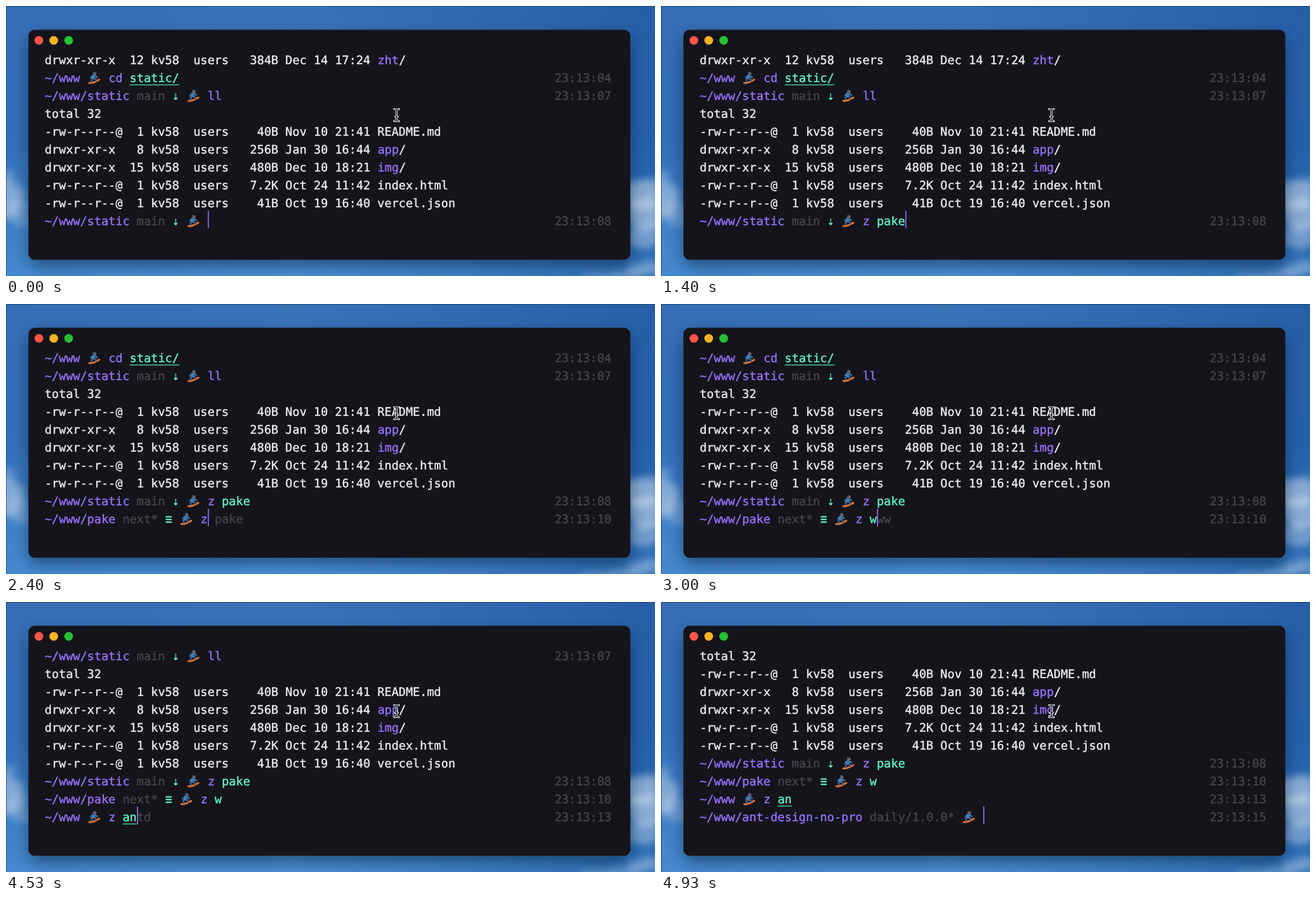
Write an HTML page that moves like this. It is 1160x483 px and loops after 5200 ms.

```html
<!DOCTYPE html>
<html lang="en">
<head>
<meta charset="utf-8">
<title>Terminal</title>
<style>
  html, body { margin: 0; width: 100%; height: 100%; overflow: hidden; background: #3a72b8; }
  svg { display: block; width: 100%; height: 100%; }
  text {
    font-family: "DejaVu Sans Mono", "Noto Sans Mono", monospace;
    font-size: 21.03px;
    white-space: pre;
    text-rendering: geometricPrecision;
    stroke-width: .45px;
  }
  .white { fill: #edecee; stroke: #edecee; }
  .purple { fill: #9671fb; stroke: #9671fb; }
  .green { fill: #5ff5c0; stroke: #5ff5c0; }
  .gray { fill: #454449; stroke: #454449; }
  .sign { fill: #5ff5c0; font-weight: bold; }
  .link { fill: #5ff5c0; }
</style>
</head>
<body>
<svg viewBox="0 0 1160 483" preserveAspectRatio="none">
  <defs>
    <linearGradient id="sky" x1="0" y1="0" x2="0" y2="1">
      <stop offset="0" stop-color="#3a72b8"/>
      <stop offset=".5" stop-color="#3574be"/>
      <stop offset="1" stop-color="#4c92d8"/>
    </linearGradient>
    <linearGradient id="side">
      <stop offset="0" stop-color="#134f9c" stop-opacity=".12"/>
      <stop offset=".45" stop-color="#134f9c" stop-opacity="0"/>
      <stop offset="1" stop-color="#0f4791" stop-opacity=".45"/>
    </linearGradient>
    <filter id="cloud" filterUnits="userSpaceOnUse" x="-60" y="240" width="1280" height="300">
      <feTurbulence type="fractalNoise" baseFrequency=".03" numOctaves="4" seed="4" result="n"/>
      <feDisplacementMap in="SourceGraphic" in2="n" scale="30" xChannelSelector="R" yChannelSelector="G"/>
      <feGaussianBlur stdDeviation="6.500"/>
    </filter>
    <filter id="blur" x="-20%" y="-20%" width="140%" height="140%">
      <feGaussianBlur stdDeviation="14"/>
    </filter>
    <g id="rider" fill="none" stroke-linecap="round" stroke-linejoin="round">
      <path d="M3.500 1.500Q9 2 14-.5T21.500-4.500" stroke="#8a431f" stroke-width="3.800"/>
      <path d="M3.500 1Q9 1.500 14-1T21.500-5" stroke="#ee7d33" stroke-width="2.400"/>
      <path d="M8-1.500L7.500-5L10.500-7.500L15-6L15.500-3" stroke="#3f5680" stroke-width="3.600"/>
      <path d="M11-8L12-12" stroke="#3b7fb8" stroke-width="5.600"/>
      <path d="M10-11.500L6.500-8.500M14-11.500L18-9" stroke="#3b7fb8" stroke-width="2.800"/>
      <circle cx="13" cy="-15.500" r="3.100" fill="#40577c"/>
      <path d="M14-15H15.500" stroke="#c9704a" stroke-width="2"/>
      <path d="M6-8h.1M18.500-8.700h.1" stroke="#4b4a5c" stroke-width="2.600"/>
    </g>
    <path id="beam" d="M693.800 184.500Q697 184.500 698 187Q699 184.500 702.200 184.500M698 187V203.500M693.800 206Q697 206 698 203.500Q699 206 702.200 206M695.800 198H700.200" fill="none"/>
  </defs>

  <rect width="1160" height="483" fill="url(#sky)"/>
  <rect width="1160" height="483" fill="url(#side)"/>
  <g id="clouds" fill="#c3d6ea" filter="url(#cloud)"></g>
  <rect x="40" y="56" width="1076" height="410" rx="16" fill="#06152c" opacity=".48" filter="url(#blur)"/>
  <path d="M0 .5H1160M.5 0V483" stroke="#10233f" stroke-opacity=".65" fill="none"/>

  <rect x="40" y="42.500" width="1076" height="411.500" rx="11.500" fill="#15141b"/>
  <rect x="40.500" y="43" width="1075" height="410.500" rx="11" fill="none" stroke="#2b2a33" stroke-opacity=".4"/>
  <circle cx="58.800" cy="61.500" r="7.800" fill="#fb5549"/>
  <circle cx="85.300" cy="61.500" r="7.800" fill="#fbb225"/>
  <circle cx="112" cy="61.500" r="7.800" fill="#23c133"/>

  <g id="screen"></g>
  <rect id="caret" y="366" width="2" height="31.500" fill="#8d6be8"/>
  <use href="#beam" stroke="#f4f4f6" stroke-width="3.600" stroke-linecap="round"/>
  <use href="#beam" stroke="#17161c" stroke-width="1.500"/>
</svg>

<script>
const LOOP = 5200, LEFT = 69.2, PITCH = 12.66, BASE = 104.4, LINE = 32, ROWS = 10;
const $ = id => document.getElementById(id);
const colX = col => LEFT + col * PITCH;

// Clouds: x, y, rx, ry, opacity
$("clouds").innerHTML = [
  [6, 345, 28, 34, .5], [24, 372, 22, 24, .3], [2, 304, 14, 12, .3],
  [1136, 338, 32, 26, .6], [1148, 374, 34, 32, .6], [1140, 414, 28, 20, .45],
  [1158, 312, 26, 9, .35], [1090, 482, 60, 8, .4], [1148, 472, 34, 12, .4]
].map(([x, y, rx, ry, o]) =>
  `<ellipse cx="${x}" cy="${y}" rx="${rx}" ry="${ry}" opacity="${o}"/>`).join("");

// A line is a list of [style, text] runs; "rider" takes two cells.
const file = (mode, links, size, date, name) => {
  const info = mode.padEnd(11) + String(links).padStart(3) +
    " kv58  users " + size.padStart(6) + ` ${date} `;
  return name.endsWith("/")
    ? [["white", info], ["purple", name.slice(0, -1)], ["white", "/"]]
    : [["white", info + name]];
};

const prompt = (path, branch, sign, time) => {
  const runs = [["purple", path + " "]];
  if (branch) runs.push(["gray", branch + " "]);
  if (sign) runs.push(["sign", sign + " "]);
  runs.push(["rider", "  "], ["white", " "]);
  runs.time = time;
  return runs;
};

const command = (typed, linked) => {
  const [name, arg] = typed.split(" ");
  const runs = [["purple", name]];
  if (arg !== undefined) runs.push(["white", " "], ["green", arg, linked]);
  return runs;
};

const withCommand = (line, typed, linked) =>
  Object.assign([...line, ...command(typed, linked)], { time: line.time });

const inStatic = time => prompt("~/www/static", "main", "⇣", time);
const inWww = time => prompt("~/www", "", "", time);
const DIR = "drwxr-xr-x", FILE = "-rw-r--r--@";

const output = [
  file(DIR, 12, "384B", "Dec 14 17:24", "zht/"),
  withCommand(inWww("23:13:04"), "cd static/", true),
  withCommand(inStatic("23:13:07"), "ll"),
  [["white", "total 32"]],
  file(FILE, 1, "40B", "Nov 10 21:41", "README.md"),
  file(DIR, 8, "256B", "Jan 30 16:44", "app/"),
  file(DIR, 15, "480B", "Dec 10 18:21", "img/"),
  file(FILE, 1, "7.2K", "Oct 24 11:42", "index.html"),
  file(FILE, 1, "41B", "Oct 19 16:40", "vercel.json")
];

const session = [
  { line: inStatic("23:13:08"), typed: "z pake" },
  { line: prompt("~/www/pake", "next*", "≡", "23:13:10"), typed: "z w" },
  { line: inWww("23:13:13"), typed: "z an", linked: true },
  { line: prompt("~/www/ant-design-no-pro", "daily/1.0.0*", "", "23:13:15"), typed: "" }
];

// Start time, session entry, typed text (null: prompt not shown yet), suggestion
const steps = [
  [0, 0, "", ""], [130, 0, "z", " www"], [870, 0, "z ", "www"],
  [1070, 0, "z p", "ake"], [1130, 0, "z pa", "ke"], [1270, 0, "z pak", "e"], [1400, 0, "z pake", ""],
  [1670, 1, null, ""], [1800, 1, "", ""],
  [2400, 1, "z", " pake"], [2800, 1, "z ", "pake"], [3000, 1, "z w", "ww"],
  [3330, 2, "", ""], [3930, 2, "z", " w"], [4070, 2, "z ", "w"],
  [4400, 2, "z a", "ntd"], [4530, 2, "z an", "td"],
  [4800, 3, null, ""], [4930, 3, "", ""]
];

const width = line => line.reduce((sum, run) => sum + run[1].length, 0);

function drawLine(line, row) {
  const y = BASE + row * LINE;
  const label = (style, text, x) => `<text class="${style}" x="${x}" y="${y}">${text}</text>`;
  let col = 0, svg = "";
  for (const [style, text, linked] of line) {
    const x = colX(col);
    if (style === "rider") svg += `<use href="#rider" x="${x}" y="${y}"/>`;
    else if (text.trim()) svg += label(style, text, x);
    if (linked && text)
      svg += `<rect class="link" x="${x}" y="${y + 4}" width="${text.length * PITCH}" height="1.3"/>`;
    col += text.length;
  }
  return line.time ? svg + label("gray", line.time, colX(72)) : svg;
}

function drawStep([, index, typed, hint]) {
  const done = session.slice(0, index).map(s => withCommand(s.line, s.typed, s.linked));
  const { line, linked } = session[index];
  let current = [];
  if (typed !== null) current = typed ? withCommand(line, typed, linked) : line;
  const caretCol = width(current);
  if (hint) current.push(["gray", hint]);
  const lines = [...output, ...done, current].slice(-ROWS);
  $("screen").innerHTML = lines.map(drawLine).join("");
  $("caret").setAttribute("x", colX(caretCol) + .3);
}

let shown = null;
function render(now) {
  const t = now % LOOP;
  const step = steps.findLast(s => s[0] <= t);
  if (step !== shown) drawStep(shown = step);
}

const start = performance.now();
function tick() {
  render(performance.now() - start);
  requestAnimationFrame(tick);
}
tick();
</script>
</body>
</html>
```
